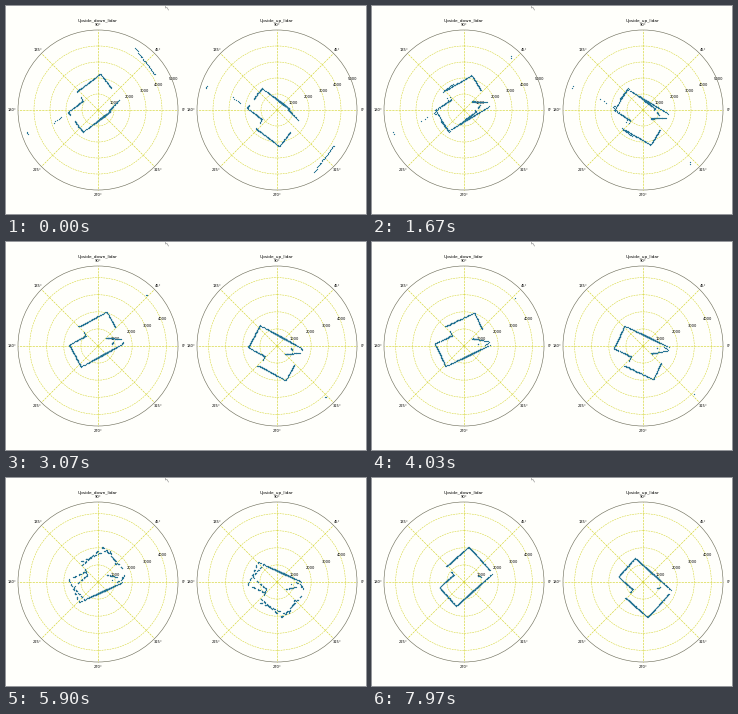
Animation, 360 px wide and 208 px high, one loop 8 s. Source, as a matplotlib script:

```python
import numpy as np
import matplotlib.pyplot as plt
from matplotlib.animation import FuncAnimation
from matplotlib.patches import Circle

W, H, DPI = 360, 208, 100
PX = 72 / DPI
RADIUS = 80
RAYS = 360
FRAMES, STEP = 200, 40
GRID, DOTS, PAPER, EDGE = "#d3d32a", "#267494", "#fffffb", "#6f6f5c"
PLOTS = [(92, 104, 1, "Upside_down_lidar"), (271, 104, -1, "Upside_up_lidar")]

# The room in its own axes: a rectangle with a step, openings and a corridor.
LONG, WIDE, STEP_U, STEP_V = 49, 36, 19, 25
HINGE, DOOR = 4, 16
WALLS = [
    (0, 0, LONG, 0),
    (LONG, 18, LONG, WIDE),
    (LONG, WIDE, STEP_U, WIDE),
    (STEP_U, STEP_V + 5, STEP_U, STEP_V),
    (STEP_U, STEP_V, 0, STEP_V),
    (0, STEP_V, 0, 21),
    (0, 14, 0, 0),
    (92, 2, 92, 39),
    (-8, STEP_V, -18, STEP_V),
    (-45, 31, -45, 36),
]

# Corner x, corner y, room tilt, door angle, side hatch shut (0..1)
START = np.array([-15, -22, 37.2, 190, 0])
TURNED = np.array([-16, -21, 30.8, 145, 1])
FARTHEST = np.array([-19, -20, 24.4, 143, 1])
BACK = np.array([-8, -24, 41.7, 90, 1])

rays = np.radians(np.arange(RAYS) * 360 / RAYS)
noise = np.random.default_rng(5).normal(0, 0.15, RAYS)


def scan(pose):
    """Distance to the nearest wall along every ray, seen from the sensor."""
    x, y, tilt, door, shut = pose
    swing = np.radians(door)
    tip = LONG + DOOR * np.cos(swing), HINGE + DOOR * np.sin(swing)
    walls = WALLS + [(LONG, HINGE, *tip), (0, 14, 0, 14 + 7 * shut)]
    c, s = np.cos(np.radians(tilt)), np.sin(np.radians(tilt))
    dx, dy = np.cos(rays), np.sin(rays)
    best = np.full(RAYS, np.inf)
    for u0, v0, u1, v1 in walls:
        ax0, ay0 = x + c * u0 - s * v0, y + s * u0 + c * v0
        ex, ey = c * (u1 - u0) - s * (v1 - v0), s * (u1 - u0) + c * (v1 - v0)
        det = dx * ey - dy * ex
        det = np.where(np.abs(det) < 1e-9, 1e-9, det)
        dist = (ax0 * ey - ay0 * ex) / det
        along = (ax0 * dy - ay0 * dx) / det
        hit = (dist > 0) & (along >= 0) & (along <= 1)
        best = np.where(hit, np.minimum(best, dist), best)
    return np.where(np.isinf(best), np.nan, best + noise)


def keep(new, old):
    """A ray without an echo keeps its last reading."""
    return np.where(np.isnan(new), old, new)


def sweep(old, new, progress, chunk):
    """Refresh every other sector in one turn, the rest in the next."""
    i = np.arange(RAYS)
    due = ((i // chunk) % 2 + i / RAYS) / 2
    return np.where(due < progress, keep(new, old), old)


def part(t, begin, end):
    return np.clip((t - begin) / (end - begin), 0, 1)


def ranges(t):
    r = sweep(scan(START), scan(TURNED), part(t, 0, 2.5), 1)
    turn = part(t, 2.53, 4.33)
    if turn > 0:
        r = keep(scan(TURNED + (FARTHEST - TURNED) * turn), r)
    return sweep(r, scan(BACK), part(t, 5.07, 7.55), 5)


fig = plt.figure(figsize=(W / DPI, H / DPI), dpi=DPI, facecolor=PAPER)
ax = fig.add_axes([0, 0, 1, 1])
ax.set_xlim(0, W)
ax.set_ylim(H, 0)
ax.axis("off")


def label(x, y, text, size=3.6):
    return ax.text(x, y, text, fontsize=size * PX, ha="center", va="center",
                   family="DejaVu Sans", color="black")


def build_plot(cx, cy, title):
    for deg in range(0, 360, 45):
        c, s = np.cos(np.radians(deg)), np.sin(np.radians(deg))
        ax.plot([cx, cx + RADIUS * c], [cy, cy - RADIUS * s], color=GRID,
                lw=0.6 * PX, ls="--", zorder=1)
        label(cx + 85.5 * c, cy - 85.5 * s, f"{deg}°")
    ax.add_patch(Circle((cx, cy), RADIUS, fill=False, ec=EDGE,
                        lw=0.6 * PX, zorder=2))
    label(cx, cy - 89, title, 4.25)
    rings = [ax.add_patch(Circle((cx, cy), 1, fill=False, ec=GRID,
                                 lw=0.5 * PX, ls="--", zorder=1))
             for _ in range(4)]
    marks = [label(cx, cy, str(1000 * k)) for k in range(1, 6)]
    dots, = ax.plot([], [], "o", ms=1.3 * PX, mew=0, color=DOTS, zorder=3)
    return rings, marks, dots


artists = [build_plot(cx, cy, title) for cx, cy, _, title in PLOTS]

# tail of a mouse pointer at the top edge
ax.plot([159.5, 159.5, 161, 162.5], [0, 2, 1.5, 4], color="#9a9a9a",
        lw=0.7 * PX)


def update(i):
    t = i * STEP / 1000
    gap = RADIUS * 1000 / (5000 if t < 3 else 4680)
    r = ranges(t)
    tilt = np.radians(22.5)
    for (cx, cy, sign, _), (rings, marks, dots) in zip(PLOTS, artists):
        dots.set_data(cx + r * np.cos(rays), cy - sign * r * np.sin(rays))
        for k, ring in enumerate(rings, 1):
            ring.set_radius(k * gap)
        for k, mark in enumerate(marks, 1):
            mark.set_position((cx + k * gap * np.cos(tilt) + 1.6,
                               cy - k * gap * np.sin(tilt) - 0.6))
            mark.set_visible(k * gap <= RADIUS)
    return []


anim = FuncAnimation(fig, update, frames=FRAMES, interval=STEP, repeat=True,
                     repeat_delay=0, init_func=lambda: update(0))
plt.show()
```
